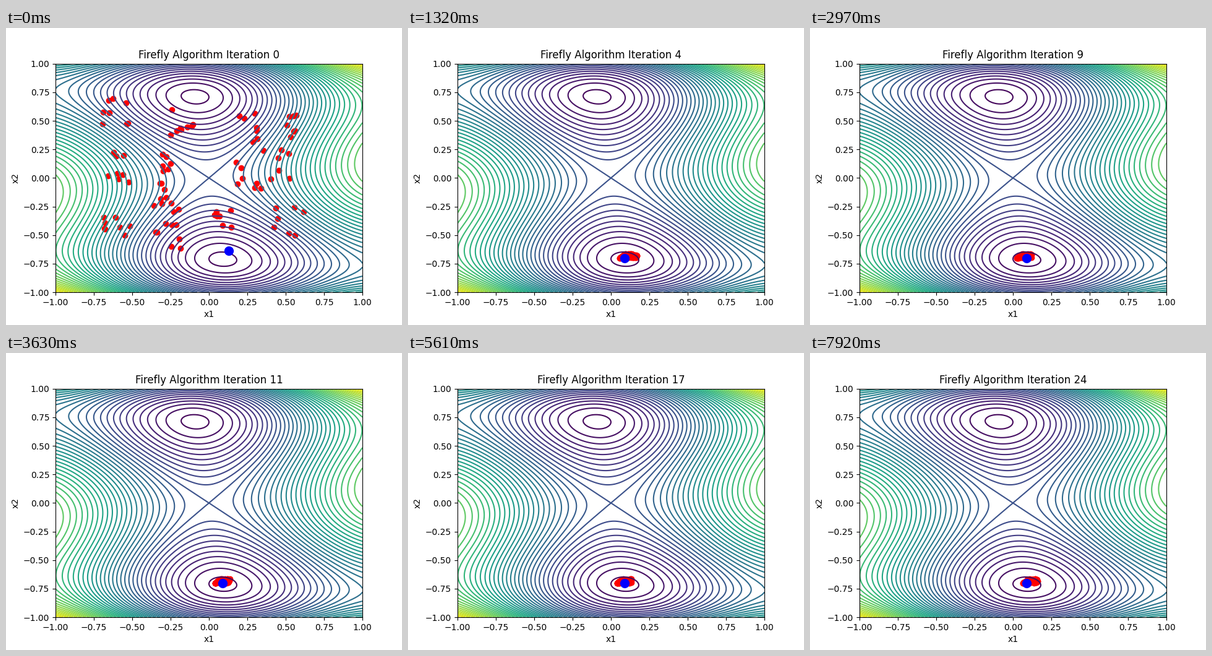
Write a matplotlib script that moves like this. It is 640 px wide and 480 px high and loops after 8000 ms.

```python
import numpy as np
import matplotlib.pyplot as plt
from matplotlib.animation import FuncAnimation

LOOP, STEP, HOLD = 8000, 80, 330   # ms
DOTS = 98
FLOOR = -0.70                      # lowest row of the gathered swarm

# Centres of the loose groups in the starting swarm.
GROUPS = np.array([
    (-0.60, 0.57), (-0.60, 0.10), (-0.59, -0.36), (-0.30, 0.08),
    (-0.15, 0.46), (-0.26, -0.22), (-0.27, -0.53), (0.06, -0.38),
    (0.24, 0.00), (0.25, 0.44), (0.55, 0.48), (0.45, 0.12), (0.52, -0.36),
])


def start_swarm():
    rng = np.random.default_rng(5)
    spread = rng.uniform(-1, 1, (DOTS, 2)) * (0.10, 0.14)
    return np.resize(GROUPS, (DOTS, 2)) + spread


def gathered_swarm(it):
    """Flat-bottomed cluster that sways around the minimum and narrows."""
    rng = np.random.default_rng(it)
    centre = 0.093 + 0.02 * np.cos(2 * np.pi * (it - 4) / 10)
    half = 0.048 + 0.065 * np.exp(-it / 2)
    offset = np.linspace(-half, half, DOTS)
    rise = 0.038 * np.clip((offset + half) / 0.035, 0, 1)
    return np.column_stack([centre + offset, FLOOR + rise * rng.random(DOTS)])


def camel(x, y):
    """Six-hump camel function."""
    return (4 - 2.1 * x**2 + x**4 / 3) * x**2 + x * y + (4 * y**2 - 4) * y**2


fig, ax = plt.subplots(figsize=(6.4, 4.8), dpi=100)
axis = np.linspace(-1, 1, 201)
X, Y = np.meshgrid(axis, axis)
ax.contour(X, Y, camel(X, Y), levels=50, cmap="viridis")
flies = ax.scatter([], [], color="red")
best, = ax.plot([], [], "o", color="blue", markersize=10)
ax.set(xlim=(-1, 1), ylim=(-1, 1), xlabel="x1", ylabel="x2")
title = ax.set_title("")


def update(frame):
    it = (frame * STEP + STEP - 1) // HOLD
    flies.set_offsets(gathered_swarm(it) if it else start_swarm())
    x, y = (0.09, FLOOR) if it else (0.13, -0.636)
    best.set_data([x], [y])
    title.set_text(f"Firefly Algorithm Iteration {it}")
    return flies, best, title


anim = FuncAnimation(fig, update, frames=LOOP // STEP, interval=STEP,
                     repeat=True, repeat_delay=0)
plt.show()
```
